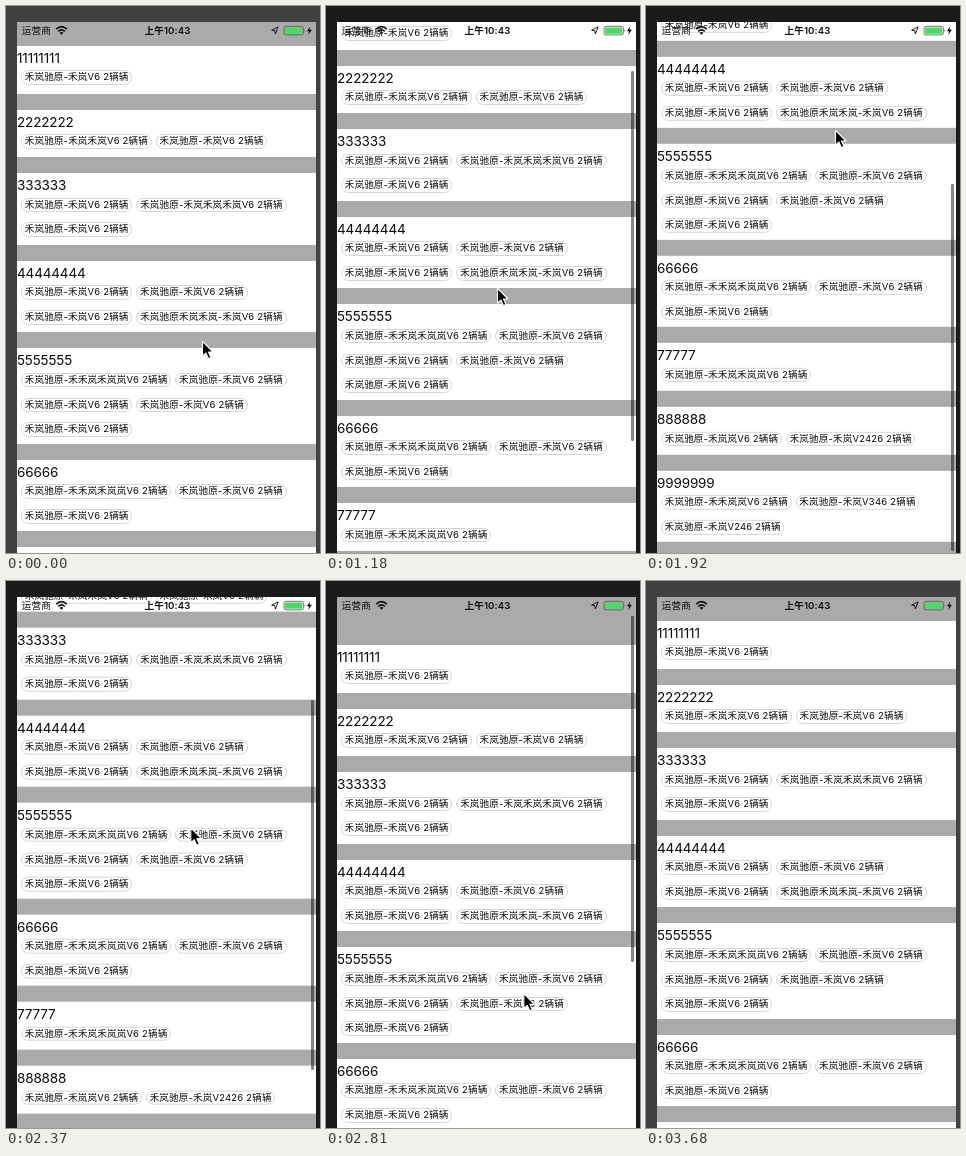
Animation of 314 by 547 pixels, one loop 3.78 s. Source, as an HTML page:

```html
<!DOCTYPE html>
<html lang="zh-CN">
<head>
<meta charset="utf-8">
<title>List scrolling</title>
<style>
  html, body { margin: 0; width: 100%; height: 100%; overflow: hidden; }
  body { position: relative; background: #414141; font-family: Inter, "Noto Sans CJK SC", "Noto Sans CJK", sans-serif; color: #0c0c0c; }
  #screen { position: absolute; left: 11px; top: 16px; width: 298.5px; height: 531px; overflow: hidden; background: #aaa; }
  #list { position: absolute; left: 0; top: 0; width: 100%; }
  .card { position: absolute; left: 0; width: 100%; background: #fff; }
  .title { position: absolute; left: 0; top: 0; font-size: 13.5px; line-height: 24px; letter-spacing: -.15px; white-space: nowrap; }
  .pill { position: absolute; box-sizing: border-box; height: 14.6px; border: 1px solid #d6d6d6; border-radius: 7.3px;
    font-size: 9.5px; line-height: 12.6px; letter-spacing: .2px; white-space: nowrap; display: flex; justify-content: center; }
  #bar { position: absolute; left: 294.2px; width: 2.4px; border-radius: 1.2px; background: rgba(0, 0, 0, .48); }
  #status, #cursor { position: absolute; left: 0; top: 0; }
  #status text { font-size: 9.6px; }
</style>
</head>
<body>
<div id="screen">
  <div id="list"></div>
  <div id="bar"></div>
</div>
<svg id="status" width="314" height="547" fill="#0c0c0c">
  <text x="15.8" y="28.1" letter-spacing=".1">运营商</text>
  <g fill="none" stroke="#0c0c0c" stroke-width="1.6">
    <path d="M50.2 23.1Q55.5 18.3 60.8 23.1"/>
    <path d="M52.2 25.3Q55.5 22.4 58.8 25.3"/>
  </g>
  <path d="M53.6 26.7Q55.5 25.2 57.4 26.7L55.5 28.8Z"/>
  <text x="161.5" y="28.1" text-anchor="middle" font-weight="600" letter-spacing=".1">上午10:43</text>
  <path d="M272.2 20.8L265.6 24.2L268.9 24.7L269.4 28Z" fill="none" stroke="#0c0c0c" stroke-width=".9" stroke-linejoin="round"/>
  <rect x="278" y="20.3" width="19.4" height="8.6" rx="2" fill="none" stroke="#555" stroke-width=".8"/>
  <rect x="279.1" y="21.4" width="17.2" height="6.4" rx="1.1" fill="#4cd964"/>
  <path d="M298.4 23.2Q299.8 24.6 298.4 26Z" fill="#555"/>
  <path d="M304.2 20.4L300.9 25.2H303.1L302.2 28.9L305.9 23.7H303.5Z"/>
</svg>
<svg id="cursor" width="16" height="22">
  <path d="M1 .8V15.6L4.4 12.5L6.8 18L9.4 16.9L7 11.5H11.6Z" fill="#000" stroke="#fff" stroke-width="1.1" stroke-linejoin="round"/>
</svg>
<script>
const LOOP = 3780, STEP = 147.1;   // the picture moves in even steps
const PT = 0.796;                  // screen points to pixels
const END = 201;                   // furthest resting scroll
const $ = id => document.getElementById(id);

// Each card: title, then rows of tag endings
const cards = [
  ['11111111', ['-禾岚V6']],
  ['2222222', ['-禾岚禾岚V6', '-禾岚V6']],
  ['333333', ['-禾岚V6', '-禾岚禾岚禾岚V6'], ['-禾岚V6']],
  ['44444444', ['-禾岚V6', '-禾岚V6'], ['-禾岚V6', '禾岚禾岚-禾岚V6']],
  ['5555555', ['-禾禾岚禾岚岚V6', '-禾岚V6'], ['-禾岚V6', '-禾岚V6'], ['-禾岚V6']],
  ['66666', ['-禾禾岚禾岚岚V6', '-禾岚V6'], ['-禾岚V6']],
  ['77777', ['-禾禾岚禾岚岚V6']],
  ['888888', ['-禾岚岚V6', '-禾岚V2426']],
  ['9999999', ['-禾禾岚岚V6', '-禾岚V346'], ['-禾岚V246']]
];

function add(parent, cls, style, text = '') {
  const el = document.createElement('div');
  el.className = cls;
  el.textContent = text;
  for (const k in style) el.style[k] = style[k] + 'px';
  return parent.appendChild(el);
}

function pillWidth(text) {
  const wide = text.match(/[\u4e00-\u9fff]/g).length;
  const digits = text.match(/\d/g).length;
  return 33.3 + 9.75 * wide + 6 * (digits - 2);
}

function buildList() {
  let y = 30;
  for (const [title, ...rows] of cards) {
    const height = 30 + 30 * rows.length;
    const card = add($('list'), 'card', { top: y * PT, height: height * PT });
    add(card, 'title', {}, title);
    rows.forEach((row, r) => {
      let left = 4;
      for (const end of row) {
        const text = `禾岚驰原${end} 2辆辆`, width = pillWidth(text);
        add(card, 'pill', { left, top: 24.5 + 24.7 * r, width }, text);
        left += width + 4;
      }
    });
    y += height + 20;
  }
}

// Pointer path: step, x, y
const path = [
  [0, 196, 335], [3, 173, 332], [5, 161, 355], [7, 163, 342], [8, 171, 282],
  [10, 184, 150], [13, 189, 124], [15, 188, 185], [18, 177, 370],
  [21, 238, 497], [23, 246, 560], [26, 246, 560]
];

function pointer(n) {
  const i = path.findIndex(p => p[0] > n);
  const [a, ax, ay] = path[i - 1], [b, bx, by] = path[i];
  const f = (n - a) / (b - a);
  return [ax + (bx - ax) * f, ay + (by - ay) * f];
}

// Drag up, bounce at the end, drag down, bounce at the start
function scrollAt(n, y) {
  if (n < 8) return 0;
  if (n < 11) return 326 - y;
  if (n < 15) return END + 18 * 0.42 ** (n - 11);
  if (n < 19) return 367 - y;
  return -24 * 0.36 ** (n - 19);
}

function drawBar(n, scroll) {
  const over = Math.max(0, scroll - END);
  const from = 18.6 + 0.698 * Math.min(END, Math.max(0, scroll)) + over;
  const to = Math.min(529, 388.6 + 0.698 * Math.max(0, scroll) + Math.min(0, scroll));
  const bar = $('bar').style;
  bar.top = from + 'px';
  bar.height = to - from + 'px';
  bar.opacity = n < 8 || n > 24 ? 0 : n < 24 ? 1 : 0.5;
}

function draw() {
  const n = Math.floor(performance.now() % LOOP / STEP);
  const [x, y] = pointer(n), scroll = scrollAt(n, y);
  document.body.style.background = n < 7 || n > 24 ? '#414141' : n < 24 ? '#1b1b1b' : '#2e2e2e';
  $('list').style.transform = `translateY(${-scroll}px)`;
  $('cursor').style.transform = `translate(${x - 0.5}px, ${y - 0.5}px)`;
  drawBar(n, scroll);
  requestAnimationFrame(draw);
}

buildList();
draw();
</script>
</body>
</html>
```
